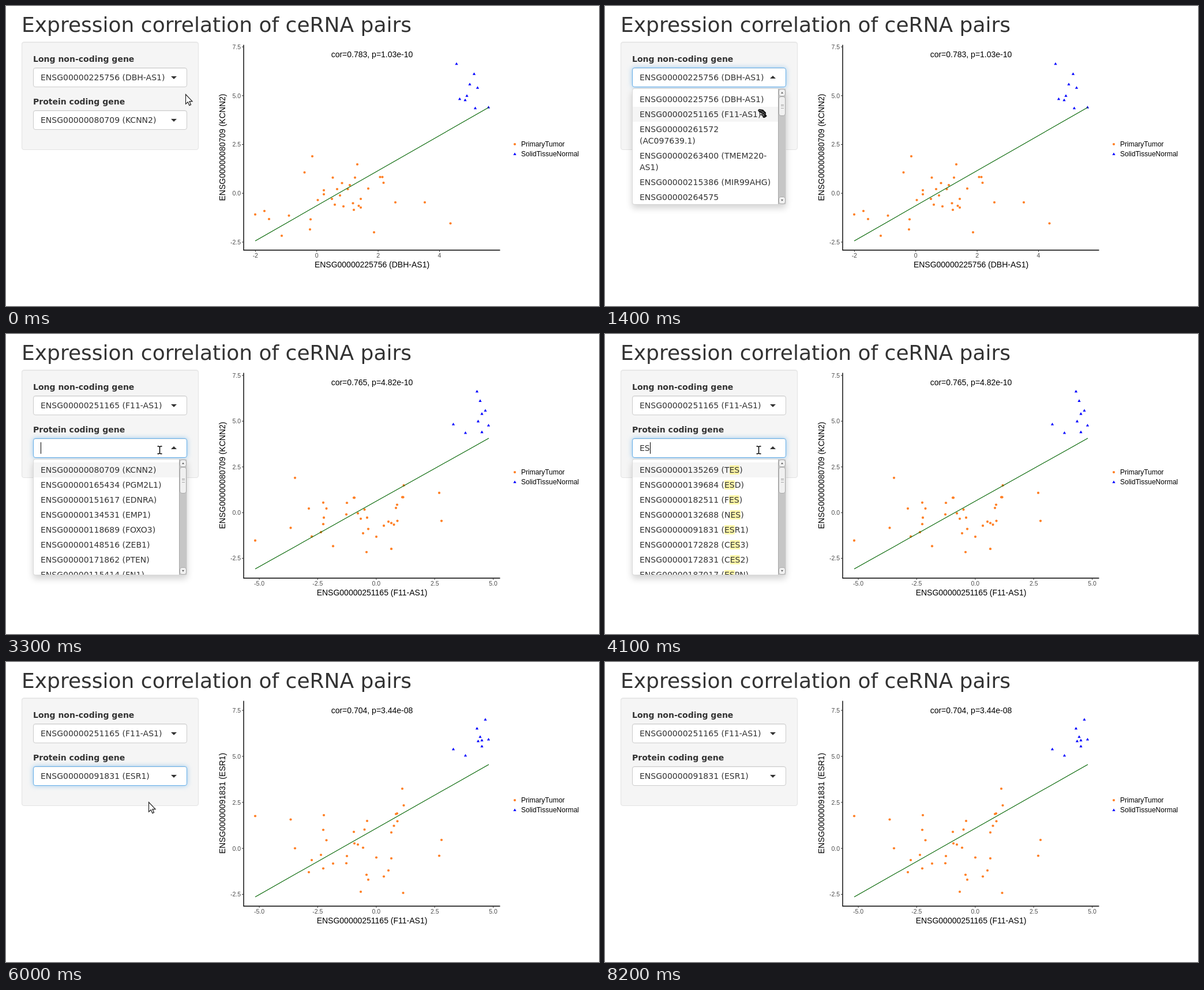
Recreate the animation shown at these times as an HTML page. Size 1028 px wide and 521 px high, loop 8400 ms.

```html
<!DOCTYPE html>
<html lang="en">
<head>
<meta charset="utf-8">
<title>Expression correlation of ceRNA pairs</title>
<style>
  html, body { margin: 0; width: 100%; height: 100%; overflow: hidden; background: #fff; }
  body { position: relative; font: 14px/20px "DejaVu Sans", sans-serif; color: #333; }
  body > *, .menu > .bar, .bar * { position: absolute; box-sizing: border-box; }
  h1 { left: 27px; top: 13px; margin: 0; font-size: 36px; line-height: 39.6px; font-weight: 400; white-space: nowrap; }
  #plot, #pointer { left: 0; top: 0; }
  #plot { font-family: "Liberation Sans", Arial, sans-serif; font-size: 14px; }
  .tick { font-size: 10.5px; fill: #4d4d4d; }
  .legend { font-size: 12px; }
  .well { left: 27px; top: 62px; width: 307px; height: 188px; background: #f5f5f5;
    border: 1px solid #e3e3e3; border-radius: 4px; box-shadow: inset 0 1px 1px rgba(0,0,0,.05); }
  .label { left: 47px; font-weight: 700; white-space: nowrap; }
  .field { left: 47px; width: 267px; height: 34px; padding: 6px 12px; background: #fff;
    border: 1px solid #ccc; border-radius: 4px; box-shadow: inset 0 1px 1px rgba(0,0,0,.075); white-space: pre; }
  .field.focus { border-color: #66afe9; box-shadow: inset 0 1px 1px rgba(0,0,0,.075), 0 0 8px rgba(102,175,233,.6); }
  .field::after { content: ""; position: absolute; left: 238px; top: 14px; border: 5px solid transparent;
    border-top-color: #333; border-bottom: 0; }
  .field.open::after { top: 13px; border-top: 0; border-bottom: 5px solid #333; }
  .field.caret span::after { content: ""; position: absolute; width: 1px; height: 20px; background: #000; }
  .menu { left: 47px; width: 267px; background: #fff; border: 1px solid rgba(0,0,0,.15);
    border-radius: 4px; box-shadow: 0 6px 12px rgba(0,0,0,.175); }
  .menu.opening { clip-path: inset(0 0 calc(100% - 10px) 0); }
  .list { max-height: 200px; box-sizing: border-box; padding: 5px 0; overflow: hidden; }
  .list div { padding: 3px 12px; white-space: pre; }
  .list .on { background: #f5f5f5; }
  mark { background: rgba(255,237,40,.4); color: inherit; border-radius: 1px; }
  .bar { right: 0; top: 0; width: 13px; height: 200px; background: #c6c6c6; border-left: 1px solid #aaa; }
  .bar i { left: 0; width: 12px; background: #f0f0f0; border: 1px solid #aaa; border-radius: 4px; }
  .bar i::after { content: ""; position: absolute; left: 3px; top: 4px; border: 2px solid transparent; }
  .bar .up { top: 0; height: 13px; }
  .bar .up::after { top: 2px; border-bottom: 3px solid #666; }
  .bar .down { bottom: 0; height: 13px; }
  .bar .down::after { border-top: 3px solid #666; }
  .bar .thumb { top: 13px; }
  .bar .thumb::after { left: 3px; top: calc(50% - 3px); width: 5px; height: 5px; border: solid #aaa; border-width: 1px 0;
    background: linear-gradient(#f0f0f0 1px, #aaa 1px 2px, #f0f0f0 2px); }
  [hidden] { display: none; }
</style>
</head>
<body>
<h1>Expression correlation of ceRNA pairs</h1>
<svg id="plot" width="1028" height="521"></svg>
<div class="well"></div>
<div class="label" style="top:82px">Long non-coding gene</div>
<div class="label" style="top:156px">Protein coding gene</div>
<div class="field" id="lnc" style="top:107px"><span></span></div>
<div class="field" id="pcg" style="top:181px"><span></span></div>
<svg id="pointer" width="1028" height="521">
  <g id="arrow"><path d="M.5 .5V17.2L4.3 13.7 6.9 19.6 9.5 18.4 7 12.6H12Z" fill="#fff" stroke="#222" stroke-width="1.2"/></g>
  <g id="hand">
    <path d="M0 2 2 0 9 1 14 6V10L16 12 12 15H9L8 12 4 10 7 8 1 4Z" fill="#111"/>
    <path d="M2 2 8 4 13 9M7 6 11 11M6 10 9 10 11 13" fill="none" stroke="#fff" stroke-dasharray="1 1"/>
  </g>
  <g id="beam" fill="none">
    <path d="M-3.5-6H-1L.5-5 2-6H4.5M.5-5V6M-3.5 7H-1L.5 6 2 7H4.5" stroke="#fff" stroke-width="3"/>
    <path d="M-3.5-6H-1L.5-5 2-6H4.5M.5-5V6M-3.5 7H-1L.5 6 2 7H4.5" stroke="#000" stroke-width="1.5"/>
  </g>
</svg>
<script>
const $ = id => document.getElementById(id);

// Sample positions per gene: 36 tumours, then 9 normals.
const TUMORS = 36;
const dbh = [432, 448, 456, 478, 490.5, 517.5, 531, 528, 527, 540.5, 551, 551, 566.5, 565, 570, 574, 579, 582.5,
  585, 592.5, 596, 601.5, 603, 605, 609, 611.5, 615, 615, 628, 638, 648.5, 652.5, 654.5, 675, 726, 770.5,
  781, 811.5, 804, 817.5, 799, 786.5, 796, 813.5, 836.5];
const kcnn2 = [362, 356, 370, 399, 364, 289, 261, 370.5, 388, 337, 320, 327, 298, 335, 345, 318, 329, 307.5,
  348, 318, 311, 342.5, 354, 298, 275, 347, 350, 335, 317, 393, 297, 297, 307, 341, 341, 377.5,
  100.5, 118, 136, 142, 156, 161.5, 163.5, 177.5, 176];
const f11 = [546, 628, 530, 625, 619, 751, 501, 642, 567, 615, 621.5, 610, 604, 551, 668, 525, 590, 591,
  672.5, 555.5, 678, 663, 493.5, 603, 689.5, 550, 655, 626, 676, 668, 687, 688.5, 550, 678.5, 755, 432,
  816.5, 822, 831, 825, 818.5, 775.5, 836.5, 796.5, 825];
const esr1 = [335, 378, 344, 369.5, 322.5, 336.5, 323.5, 339.5, 350, 399, 291, 317, 315, 266, 296, 365, 349.5, 337,
  284.5, 309.5, 263, 362, 273.5, 295, 249, 358.5, 372.5, 276, 264, 341, 220, 401, 291.5, 276.5, 309, 267.5,
  115.5, 130, 100, 136, 137.5, 151.5, 134.5, 162.5, 146.5];

const DBH = "ENSG00000225756 (DBH-AS1)", F11 = "ENSG00000251165 (F11-AS1)";
const KCNN2 = "ENSG00000080709 (KCNN2)", ESR1 = "ENSG00000091831 (ESR1)";
const fives = ["-5.0", "-2.5", "0.0", "2.5", "5.0"];

const plots = [
  { xs: dbh, ys: kcnn2, x: DBH, y: KCNN2, stat: "cor=0.783, p=1.03e-10", end: 176,
    xTicks: ["-2", "0", "2", "4"], x0: 432.3, dx: 106.4, y0: 71, dy: 84.75 },
  { xs: f11, ys: kcnn2.map(v => 309.6 + (v - 325) * .9345), x: F11, y: KCNN2, stat: "cor=0.765, p=4.82e-10", end: 181,
    xTicks: fives, x0: 439, dx: 101.4, y0: 72, dy: 79.4 },
  { xs: f11, ys: esr1, x: F11, y: ESR1, stat: "cor=0.704, p=3.44e-08", end: 178,
    xTicks: fives, x0: 439, dx: 101.4, y0: 84, dy: 79.9 },
];

const text = (x, y, s, anchor = "middle", extra = "") =>
  `<text x="${x}" y="${y}" text-anchor="${anchor}" ${extra}>${s}</text>`;
const dot = (x, y) => `<circle cx="${x}" cy="${y}" r="2.1" fill="#ff7f24"/>`;
const tri = (x, y) => `<path d="M${x} ${y - 2.8}l2.6 4.6h-5.2z" fill="#00f"/>`;

function plotMarkup(p) {
  const xTicks = p.xTicks.map((s, i) => {
    const x = p.x0 + i * p.dx;
    return `<path d="M${x} 424v3" stroke="#333"/>` + text(x, 437, s, "middle", 'class="tick"');
  });
  const yTicks = ["7.5", "5.0", "2.5", "0.0", "-2.5"].map((s, i) => {
    const y = p.y0 + i * p.dy;
    return `<path d="M409 ${y}h3" stroke="#333"/>` + text(407, y + 3.8, s, "end", 'class="tick"');
  });
  const marks = p.xs.map((x, i) => (i < TUMORS ? dot : tri)(x, p.ys[i]));
  return `<g>${marks.join("")}
    <path d="M432 408L837 ${p.end}" stroke="#006400" stroke-width="1.1"/>
    <path d="M412 67.5V424H856.5" fill="none" stroke="#000" stroke-width="1.4"/>
    ${xTicks.join("")}${yTicks.join("")}
    ${text(634.5, 89, p.stat)}${text(634.5, 454, p.x)}
    ${text(0, 0, p.y, "middle", 'transform="translate(380 245.5) rotate(-90)"')}
    ${dot(882, 240)}${tri(882, 257.3)}
    ${text(893, 244, "PrimaryTumor", "start", 'class="legend"')}
    ${text(893, 261, "SolidTissueNormal", "start", 'class="legend"')}</g>`;
}
$("plot").innerHTML = plots.map(plotMarkup).join("");
const plotNodes = [...$("plot").children];

function makeMenu(top, thumb, items, query) {
  const node = document.createElement("div");
  node.className = "menu";
  node.style.top = top + "px";
  const rows = items.map((s, i) => {
    const label = query ? s.replaceAll(query, `<mark>${query}</mark>`) : s;
    return `<div class="${i ? "" : "on"}">${label}</div>`;
  });
  const bar = `<div class="bar"><i class="up"></i><i class="thumb" style="height:${thumb}px"></i><i class="down"></i></div>`;
  node.innerHTML = `<div class="list">${rows.join("")}</div>` + (thumb ? bar : "");
  document.body.insertBefore(node, $("pointer"));
  return node;
}
const gene = s => s.split(", ").map(g => {
  const [id, name] = g.split(" ");
  return `ENSG00000${id} (${name})`;
});
const menus = {
  lnc: makeMenu(143, 34, [DBH, F11, "ENSG00000261572\n(AC097639.1)", "ENSG00000263400 (TMEM220-\nAS1)",
    "ENSG00000215386 (MIR99AHG)", "ENSG00000264575\n(LINC00526)"]),
  all: makeMenu(217, 46, gene("080709 KCNN2, 165434 PGM2L1, 151617 EDNRA, 134531 EMP1, 118689 FOXO3, 148516 ZEB1, 171862 PTEN, 115414 FN1")),
  e: makeMenu(217, 46, gene("125730 C3, 180210 F2, 198125 MB, 135269 TES, 139684 ESD, 182511 FES, 132688 NES, 138798 EGF"), "E"),
  es: makeMenu(217, 46, gene("135269 TES, 139684 ESD, 182511 FES, 132688 NES, 091831 ESR1, 172828 CES3, 172831 CES2, 187017 ESPN"), "ES"),
  esr: makeMenu(217, 0, gene("091831 ESR1, 104413 ESRP1, 103067 ESRP2"), "ESR"),
  esr1: makeMenu(217, 0, [ESR1], "ESR1"),
};
const lncRows = menus.lnc.querySelectorAll(".list div");

// Each track holds [start ms, value...] steps.
const tracks = {
  plot: [[0, 0], [1900, 1], [5700, 2]],
  menu: [[0, ""], [400, "lnc"], [1600, ""], [2400, "all"], [3800, "e"], [4100, "es"], [4500, "esr"], [5100, "esr1"], [5400, ""]],
  focus: [[0, ""], [400, "lnc"], [2400, "pcg"], [8200, ""]],
  caret: [[0, ""], [500, "lnc"], [1000, ""], [2400, "pcg"], [3000, ""], [3300, "pcg"], [5400, ""]],
  lnc: [[0, DBH], [1600, F11]],
  pcg: [[0, KCNN2], [3300, ""], [3600, "E"], [4000, "ES"], [4400, "ESR"], [5000, "ESR1"], [5400, ESR1]],
  pointer: [
    [0, "arrow", 311, 153], [100, "arrow", 309, 150], [200, "arrow", 302, 140], [300, "hand", 293, 126],
    [400, "hand", 286, 117], [600, "hand", 285, 115], [1000, "hand", 284, 124], [1100, "hand", 281, 140],
    [1200, "hand", 276, 158], [1300, "hand", 270, 172], [1400, "hand", 265, 179], [1900, "hand", 266, 187],
    [2000, "hand", 266, 195], [2100, "hand", 265, 200], [2500, "beam", 266, 201], [5700, "arrow", 260, 216],
    [5800, "arrow", 253, 231], [5900, "arrow", 249, 240], [6000, "arrow", 247, 243], [6600, "arrow", 225, 248],
    [6700, "arrow", 195, 251], [6800, ""],
  ],
};
const at = (name, t) => tracks[name].findLast(step => step[0] <= t).slice(1);
const show = (node, on) => { node.style.display = on ? "" : "none"; };

function render(t) {
  const [plot] = at("plot", t), [menu] = at("menu", t), [focus] = at("focus", t), [caret] = at("caret", t);
  plotNodes.forEach((node, i) => show(node, i === plot));
  for (const id of ["lnc", "pcg"]) {
    const field = $(id);
    field.firstChild.textContent = at(id, t)[0];
    field.classList.toggle("focus", focus === id);
    field.classList.toggle("open", focus === id && menu !== "");
    field.classList.toggle("caret", caret === id);
  }
  for (const id in menus) show(menus[id], id === menu);
  menus.lnc.classList.toggle("opening", t < 500);
  menus.all.classList.toggle("opening", t < 2500);
  lncRows[0].className = t < 1300 ? "on" : "";
  lncRows[1].className = t < 1300 ? "" : "on";
  const [kind, x, y] = at("pointer", t);
  for (const id of ["arrow", "hand", "beam"]) show($(id), id === kind);
  if (kind) $(kind).setAttribute("transform", `translate(${x} ${y})`);
}

const start = performance.now();
function tick() {
  render((performance.now() - start) % 8400);
  requestAnimationFrame(tick);
}
tick();
</script>
</body>
</html>
```
